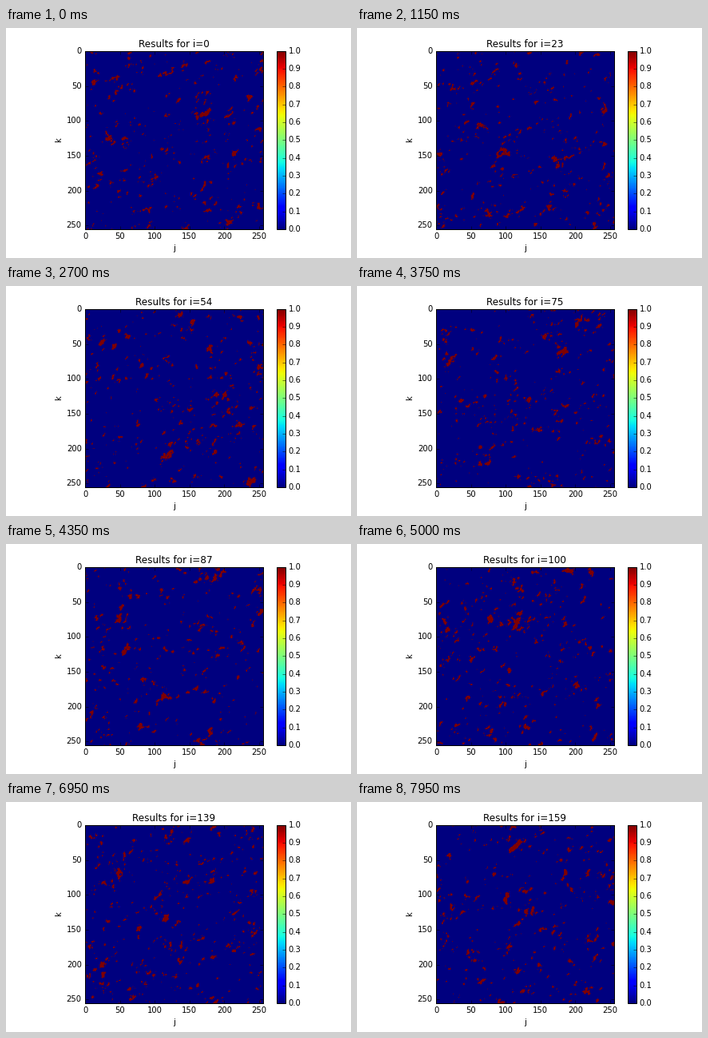
A matplotlib script for the animation above (8 s loop, 432x288 px).

```python
import numpy as np
import matplotlib.pyplot as plt
from matplotlib.animation import FuncAnimation

plt.style.use("classic")
plt.rcParams.update({
    "font.family": "DejaVu Sans",
    "font.size": 10,
    "figure.facecolor": "white",
    "savefig.facecolor": "white",
})

W, H, DPI = 432, 288, 72
N, SLICES, DEPTH = 256, 160, 192
FILL = 0.042     # share of cells above the threshold
CLUSTER = 0.035  # frequency below which the spectrum flattens
SLANT = 0.7      # stretches clumps along the rising diagonal


def build_volume():
    """Threshold correlated 3D noise; slices along i share clumps."""
    rng = np.random.default_rng(11)
    spec = np.fft.rfftn(rng.standard_normal((DEPTH, N, N), dtype=np.float32))
    fi = np.fft.fftfreq(DEPTH)[:, None, None]
    fk = np.fft.fftfreq(N)[None, :, None]
    fj = np.fft.rfftfreq(N)[None, None, :]
    f2 = fi**2 + fk**2 + fj**2 - SLANT * fj * fk
    spec *= (f2 + CLUSTER**2) ** -0.8 * np.exp(-9 * f2)
    field = np.fft.irfftn(spec, s=(DEPTH, N, N))[:SLICES]
    cut = np.quantile(field[::8], 1 - FILL)
    return (field > cut).astype(np.float32)


volume = build_volume()

fig = plt.figure(figsize=(W / DPI, H / DPI), dpi=DPI)
side = 0.775 * H
ax = fig.add_axes([98.64 / W, 0.125, side / W, 0.775])
cax = fig.add_axes([338.58 / W, 0.125, side / 20 / W, 0.775])

image = ax.imshow(volume[0], cmap="jet", vmin=0, vmax=1,
                  interpolation="bilinear", interpolation_stage="rgba")
ax.set_xticks(range(0, N, 50))
ax.set_yticks(range(0, N, 50))
ax.set_xlabel("j")
ax.set_ylabel("k")
title = ax.set_title("Results for i=0")
fig.colorbar(image, cax=cax, ticks=np.linspace(0, 1, 11))


def update(i):
    image.set_data(volume[i])
    title.set_text(f"Results for i={i}")
    return image, title


anim = FuncAnimation(fig, update, frames=SLICES, interval=50,
                     repeat=True, repeat_delay=0, blit=False)
plt.show()
```
